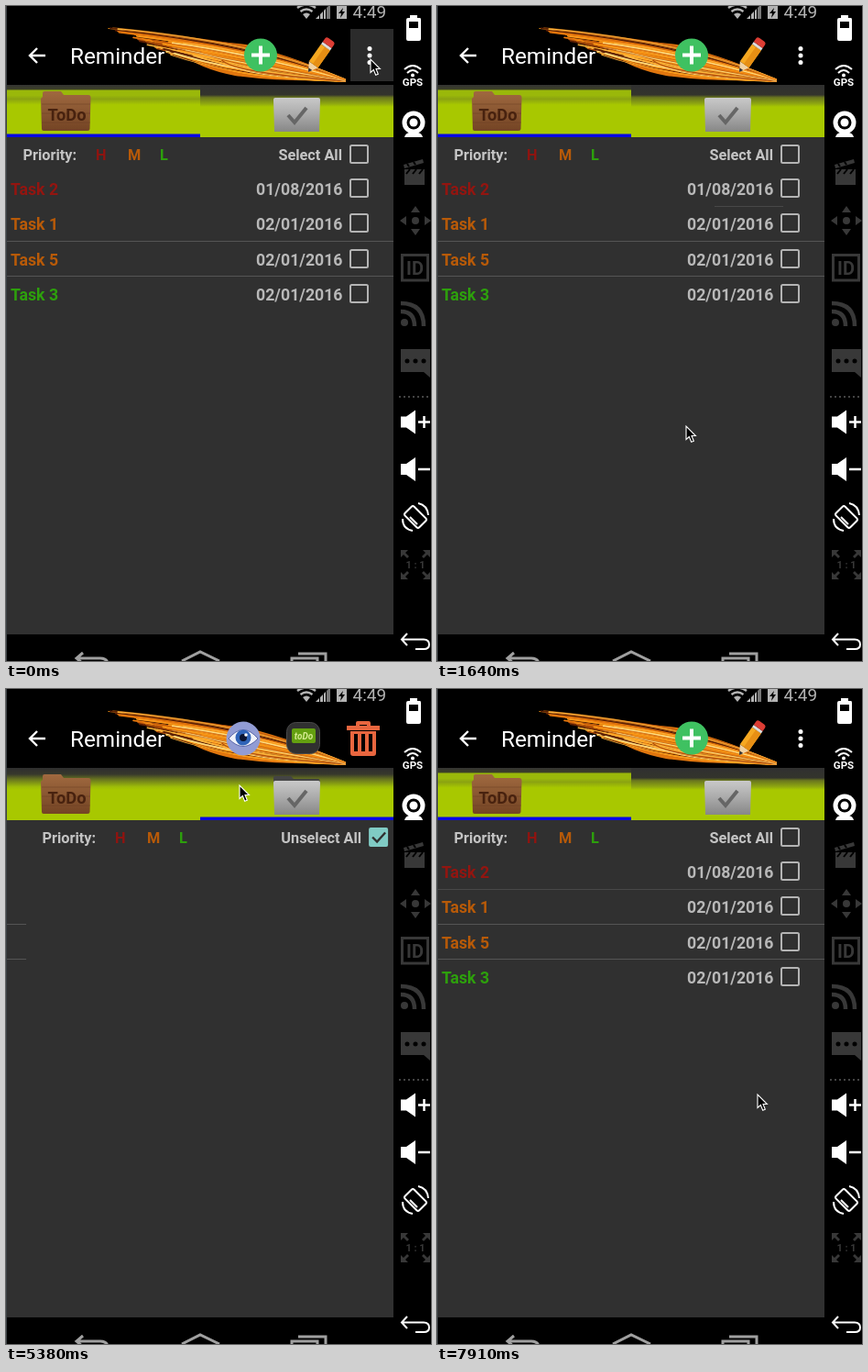
Write an HTML page that moves like this. It is 464x714 px and loops after 8000 ms.

```html
<!DOCTYPE html>
<html lang="en">
<head>
<meta charset="utf-8">
<title>Reminder</title>
<style>
html, body { margin: 0; width: 100%; height: 100%; overflow: hidden; background: #000; }
svg { display: block; width: 100%; height: 100%; font-family: Roboto, sans-serif; }
.bold { font-weight: 700; }
.head { font-size: 16.3px; }
.row { font-size: 17.7px; }
.end { text-anchor: end; }
.mid { text-anchor: middle; }
.line { fill: none; }
</style>
</head>
<body>
<svg viewBox="0 0 464 714">
<defs>
  <linearGradient id="dim" x2="0" y2="1">
    <stop stop-color="#303030"/><stop offset=".19" stop-color="#33342c"/>
    <stop offset=".24" stop-color="#69751f"/><stop offset=".36" stop-color="#8fa810"/>
    <stop offset=".42" stop-color="#a8c800"/>
  </linearGradient>
  <linearGradient id="shade" x2="0" y2="1">
    <stop stop-color="#2e2e2e"/><stop offset=".12" stop-color="#37382c"/>
    <stop offset=".22" stop-color="#69751f"/><stop offset=".36" stop-color="#9dbc08"/>
    <stop offset=".42" stop-color="#a8c800"/>
  </linearGradient>
  <linearGradient id="bright" x2="0" y2="1">
    <stop stop-color="#333"/><stop offset=".08" stop-color="#3c3f28"/>
    <stop offset=".11" stop-color="#9ab80a"/><stop offset=".2" stop-color="#9ab80a"/>
    <stop offset=".27" stop-color="#8ba311"/><stop offset=".38" stop-color="#a8c800"/>
  </linearGradient>
  <linearGradient id="wood" x2="0" y2="1">
    <stop stop-color="#a0693f"/><stop offset=".5" stop-color="#8a5732"/><stop offset="1" stop-color="#744424"/>
  </linearGradient>
  <linearGradient id="steel" x2="0" y2="1">
    <stop stop-color="#c9c9c9"/><stop offset=".5" stop-color="#aaa"/><stop offset="1" stop-color="#878787"/>
  </linearGradient>
  <filter id="shadow" x="-10%" y="-10%" width="120%" height="125%">
    <feDropShadow dx="0" dy="3" stdDeviation="3" flood-opacity=".6"/>
  </filter>
  <clipPath id="screen"><path d="M1 143H423V685H1Z"/></clipPath>
  <g id="trash" fill="#e8663f">
    <path d="M-18-14H-8V-17Q-8-19-6-19H6Q8-19 8-17V-14H18V-9H-18ZM-4-15V-14H4V-15Z" fill-rule="evenodd"/>
    <path d="M-14-8H14V16Q14 19 11 19H-11Q-14 19-14 16ZM-10-5V14H-6V-5ZM-2-5V14H2V-5ZM6-5V14H10V-5Z" fill-rule="evenodd"/>
  </g>
  <path id="speaker" d="M0-6H6L16-13V13L6 6H0Z"/>
  <rect id="box" x="376" y="-9.5" width="19" height="19" rx="1.5" fill="none" stroke="#b4b4b4" stroke-width="2"/>
  <g id="priority" class="bold head">
    <text x="18.5" y="168" fill="#c4c4c4">Priority:</text>
    <text x="98" y="168" fill="#8f1410">H</text>
    <text x="133" y="168" fill="#b85a08">M</text>
    <text x="168" y="168" fill="#2da00c">L</text>
  </g>
</defs>

<path d="M0 0H1V714H0Z" fill="#3c4246"/>
<path d="M1 0H464V714H1Z"/>

<!-- status bar -->
<g fill="#b4b4b4">
  <path d="M328 14L324 9Q328 6 332 9Z"/>
  <path d="M321.500 6Q328 1 334.500 6M318 2Q328-5 338 2" class="line" stroke="#b4b4b4" stroke-width="2.500"/>
  <path d="M338 14L342 10V14ZM343 14V9L346 6V14ZM347 14V5L349 3V14Z"/>
  <path d="M350 14V2L354-2V14Z" fill="#777"/>
  <path d="M361 0H372V14H361ZM368 2L363 8H366L365 13L370 6H367Z" fill-rule="evenodd"/>
  <text x="378.500" y="13" font-size="19">4:49</text>
</g>

<!-- action bar -->
<g id="flame" class="line" stroke-linecap="round"></g>
<path d="M43 54H26M34 46L26 54L34 62" class="line" stroke="#fff" stroke-width="2.400"/>
<text x="70" y="63" font-size="24.300" fill="#fff">Reminder</text>
<g id="todoTools">
  <path id="dotsPress" d="M376 25H423V82H376Z" fill="#2b2b2b"/>
  <circle cx="278" cy="53.500" r="18" fill="#3fc161"/>
  <path d="M278 43.500V63.500M268 53.500H288" stroke="#fff" stroke-width="4"/>
  <g transform="translate(330 72) rotate(-55)">
    <path d="M0 0L10-6V6Z" fill="#f2d2a2"/><path d="M0 0L4-2.400V2.400Z" fill="#333"/>
    <path d="M10-6H33V6H10Z" fill="#f6a821"/><path d="M10-1H33V6H10Z" fill="#e78f14"/>
    <path d="M33-6H36V6H33Z" fill="#ddd"/><path d="M36-6H40Q43-6 43-3V3Q43 6 40 6H36Z" fill="#dc3d34"/>
  </g>
  <path d="M397 46.500h0M397 54h0M397 61.500h0" stroke="#fff" stroke-width="5" stroke-linecap="round"/>
</g>
<g id="doneTools">
  <circle cx="259" cy="54" r="18.500" fill="#929cd4"/>
  <path d="M243 54Q259 35 275 54Q259 71 243 54Z" fill="#f0f2fa" stroke="#5a66a8"/>
  <circle cx="259" cy="53" r="8.500" fill="#2f63b8"/><circle cx="259" cy="53" r="4" fill="#0b1430"/>
  <circle cx="262" cy="50" r="1.800" fill="#fff"/>
  <rect x="306.500" y="36.500" width="36" height="34" rx="10" fill="#303030" stroke="#4a4a4a"/>
  <rect x="312" y="43" width="26" height="16" rx="2" fill="#64a010"/>
  <text x="325" y="55" font-size="10" font-style="italic" class="bold mid" fill="#d4ea90">toDo</text>
  <use href="#trash" x="390" y="54"/>
</g>

<!-- tabs -->
<path id="leftTab" d="M1 86H212V143H1Z"/>
<path id="rightTab" d="M212 86H423V143H212Z"/>
<path id="leftPress" d="M1 86H212V136H1Z" fill="#6e7a27"/>
<path id="rightPress" d="M212 86H423V136H212Z" fill="#6e7a27"/>
<path d="M40 99V95Q40 93 42 93H60L63 97H90Q92.500 97 92.500 100L91.500 134Q91.500 136 89 136H41Q39 136 39 134L38 101Z" fill="url(#wood)"/>
<path d="M39 107H92M39 117H92M39 127H92" stroke="#6b3f20" stroke-opacity=".5"/>
<text x="66.500" y="125" font-size="18.300" class="bold mid" fill="#48220f">ToDo</text>
<path id="folderTab" d="M292 104V97Q292 95 294 95H311L314 98H341Q343 98 343 104Z" fill="#444"/>
<path d="M292 102Q292 100 294 100H341Q343 100 343 102L342 137H293Z" fill="url(#steel)"/>
<path d="M308 119L315 127L328 111" class="line" stroke="#666" stroke-width="4"/>
<path id="marker" d="M1 139.500H212V143H1Z" fill="#0808e4"/>

<!-- pages -->
<path d="M1 143H423V685H1Z" fill="#303030"/>
<g clip-path="url(#screen)">
  <g id="pages">
    <use href="#priority"/>
    <text x="367" y="168" class="bold head end" fill="#c4c4c4">Select All</text>
    <use href="#box" y="161.500"/>
    <g id="rows" class="bold row"></g>
    <path id="firstRule" stroke="#484848"/>
    <path d="M1 256.500H423M1 294.500H423" stroke="#545454"/>
    <g transform="translate(422)">
      <use href="#priority"/>
      <text x="367" y="168" class="bold head end" fill="#c4c4c4">Unselect All</text>
      <rect x="375" y="151" width="21" height="21" rx="2" fill="#80cbc4"/>
      <path d="M379 161.500L384 166.500L393 156.500" class="line" stroke="#303030" stroke-width="2.400"/>
    </g>
  </g>
</g>

<!-- navigation bar -->
<g class="line" stroke="#a0a0a0" stroke-width="3">
  <path d="M84 705L77 711L84 717M77 711H103Q111 711 111 718"/>
  <path d="M192 714L212 704L233 714"/>
  <path d="M312 718V711H340V718M319 706H349V718"/>
</g>

<!-- popup menu -->
<g id="popup">
  <rect x="179" y="30" width="230" height="113" rx="2" fill="#303030" filter="url(#shadow)"/>
  <circle cx="238.500" cy="58" r="17.500" class="line" stroke="#2c7a36" stroke-width="2.500"/>
  <path d="M227 58L236 67L250 51" class="line" stroke="#55b957" stroke-width="7" stroke-linecap="round" stroke-linejoin="round"/>
  <use href="#trash" x="238.500" y="115"/>
</g>

<!-- side panel -->
<g fill="#fff" stroke="none">
  <path d="M441 10H449V13H452Q453 13 453 15V36Q453 38 451 38H439Q437 38 437 36V15Q437 13 439 13H441ZM440 17V24H450V17Z" fill-rule="evenodd"/>
  <path d="M435 69Q444 61 453 69M438 73Q444 67 450 73" class="line" stroke="#fff" stroke-width="2"/>
  <circle cx="444" cy="75.500" r="2"/>
  <text x="444" y="87" font-size="11.500" class="bold mid">GPS</text>
  <circle cx="445" cy="127" r="12.500"/><circle cx="445" cy="127" r="7.500" fill="#000"/>
  <circle cx="445" cy="127" r="4.500"/>
  <path d="M435 143Q436 139 440 138H450Q454 139 455 143Z"/>
</g>
<g fill="#383838">
  <path d="M435 178H457V195H435ZM434 173L455 167L456 171L435 177Z"/>
  <path d="M437 183L441 178M444 183L448 178M451 183L455 178M440 175L438 172M447 173L445 170" stroke="#000" stroke-width="2"/>
  <path d="M447 218L452 225H442ZM447 250L452 243H442ZM430 234L437 229V239ZM464 234L457 229V239Z"/>
  <circle cx="447" cy="234" r="4"/>
  <path d="M432.500 271.500H460.500V299H432.500Z" class="line" stroke="#383838" stroke-width="3"/>
  <text x="446.500" y="293" font-size="20" class="bold mid">ID</text>
  <circle cx="435" cy="345" r="4"/>
  <path d="M431 333Q446 333 446 349M431 324Q456 324 456 349" class="line" stroke="#383838" stroke-width="4.500"/>
  <path d="M431 374H463V405L456 399H431Z"/>
  <path d="M438 387h0M447 387h0M456 387h0" stroke="#000" stroke-width="5" stroke-linecap="round"/>
  <path d="M429 426H464" stroke="#444" stroke-width="2" stroke-dasharray="2 3"/>
  <path d="M431 593H439L436 596L440 600L438 602L434 598L431 601ZM463 593H455L458 596L454 600L456 602L460 598L463 601ZM431 625H439L436 622L440 618L438 616L434 620L431 617ZM463 625H455L458 622L454 618L456 616L460 620L463 617Z"/>
  <text x="447" y="613" font-size="11" class="bold mid">1 : 1</text>
</g>
<g fill="#fff">
  <use href="#speaker" x="431" y="453.500"/><use href="#speaker" x="431" y="505"/>
  <path d="M450 453.500H463M456.500 447V460M450 505H463" stroke="#fff" stroke-width="2.500"/>
</g>
<g class="line" stroke="#fff" stroke-width="2">
  <rect x="-7" y="-11" width="14" height="22" rx="2" transform="translate(447 557) rotate(-45)"/>
  <path d="M441 557L449 565M433 559Q433 570 444 572M461 555Q460 544 450 542"/>
  <path d="M438 684L432 690.500L438 697M432 690.500H456Q462 690.500 462 696Q462 701 456 701H447"/>
</g>

<path id="cursor" d="M0 0V14.500L3.300 11.500L5.700 17.200L8.300 16.200L6 10.500H10.400Z" stroke="#fff" stroke-width="1.100"/>
</svg>
<script>
const LOOP = 8000, FIRST = 140, TICK = 149.4;
const get = id => document.getElementById(id);
const show = (id, opacity) => get(id).setAttribute('opacity', +opacity);
const fill = (id, gradient) => get(id).setAttribute('fill', `url(#${gradient})`);

const tasks = [
  ['Task 2', '01/08/2016', '#931510'], ['Task 1', '02/01/2016', '#b85a08'],
  ['Task 5', '02/01/2016', '#b85a08'], ['Task 3', '02/01/2016', '#2da00c']
];
get('rows').innerHTML = tasks.map(([name, date, color], i) => {
  const y = 198.5 + Math.round(i * 38.3);
  return `<text x="5" y="${y + 7}" fill="${color}">${name}</text>
    <text x="367.500" y="${y + 7}" class="end" fill="#b8b8b8">${date}</text>
    <use href="#box" y="${y}"/>`;
}).join('');

let seed = 7;
const random = () => (seed = seed * 16807 % 2147483647) / 2147483647;

// A solid body with strands that fray on the left and meet at one tip.
function drawFlame() {
  const colors = ['#5a1e03', '#b4500a', '#e8780c', '#fb9a16', '#ffb53a', '#ffdc80'];
  let out = '<path d="M175 36Q215 36 262 42Q325 58 370 81Q300 83 250 76Q210 68 192 52Z" fill="#e0760e"/>';
  for (let i = 0; i < 130; i++) {
    const v = random(), shift = random() * 80, x = 106 + v * 75 + shift, y = 22 + v * 32 + shift * .15;
    const color = colors[Math.floor(random() * colors.length)];
    out += `<path d="M${x} ${y}Q${275 - v * 25} ${38 + v * 41} 370 ${80 + v * 2}"
      stroke="${color}" stroke-width="${.5 + random() * 1.6}"/>`;
  }
  get('flame').innerHTML = out;
}
drawFlame();

// Pointer stops: tick, x, y.
const stops = [
  [-1, 398, 58], [6, 398, 58], [9, 272, 458], [10, 272, 458], [12, 306, 265], [17, 155, 114],
  [23, 155, 114], [27, 255, 105], [37, 255, 105], [40, 160, 122], [45, 160, 122], [52, 350, 442]
];
function pointerAt(tick) {
  const next = stops.findIndex(stop => stop[0] >= tick);
  if (next < 1) return stops[0].slice(1);
  const [a, x0, y0] = stops[next - 1], [b, x1, y1] = stops[next];
  const u = (tick - a) / (b - a), e = u * u * (3 - 2 * u);
  return [x0 + (x1 - x0) * e, y0 + (y1 - y0) * e];
}

const within = (n, from, to) => n >= from && n < to;
const slide = n => n < 0 ? 0 : [.45, .95][n] ?? 1;

function render(time) {
  const tick = Math.floor((time % LOOP - FIRST) / TICK);
  const done = within(tick, 34, 45);
  show('popup', tick === 0 ? .5 : tick === 9 ? .4 : within(tick, 1, 9));
  show('dotsPress', tick < 1);
  show('todoTools', !done);
  show('doneTools', done);
  show('leftPress', within(tick, 19, 24) || within(tick, 42, 45));
  show('rightPress', within(tick, 29, 34));
  show('folderTab', within(tick, 29, 45));
  fill('leftTab', within(tick, 24, 45) ? 'shade' : 'bright');
  fill('rightTab', done ? 'shade' : 'dim');
  get('marker').setAttribute('transform', `translate(${done ? 211 : 0})`);
  const rule = tick < 8 ? '' : tick < 14 ? 'M303 218.500H378' : tick < 45 ? 'M237 218.500H378' : 'M1 218.500H423';
  get('firstRule').setAttribute('d', rule);
  get('pages').setAttribute('transform', `translate(${-422 * (slide(tick - 34) - slide(tick - 45))})`);
  get('cursor').setAttribute('transform', `translate(${pointerAt(tick).map(Math.round)})`);
}

function loop() {
  render(performance.now());
  requestAnimationFrame(loop);
}
loop();
</script>
</body>
</html>
```
